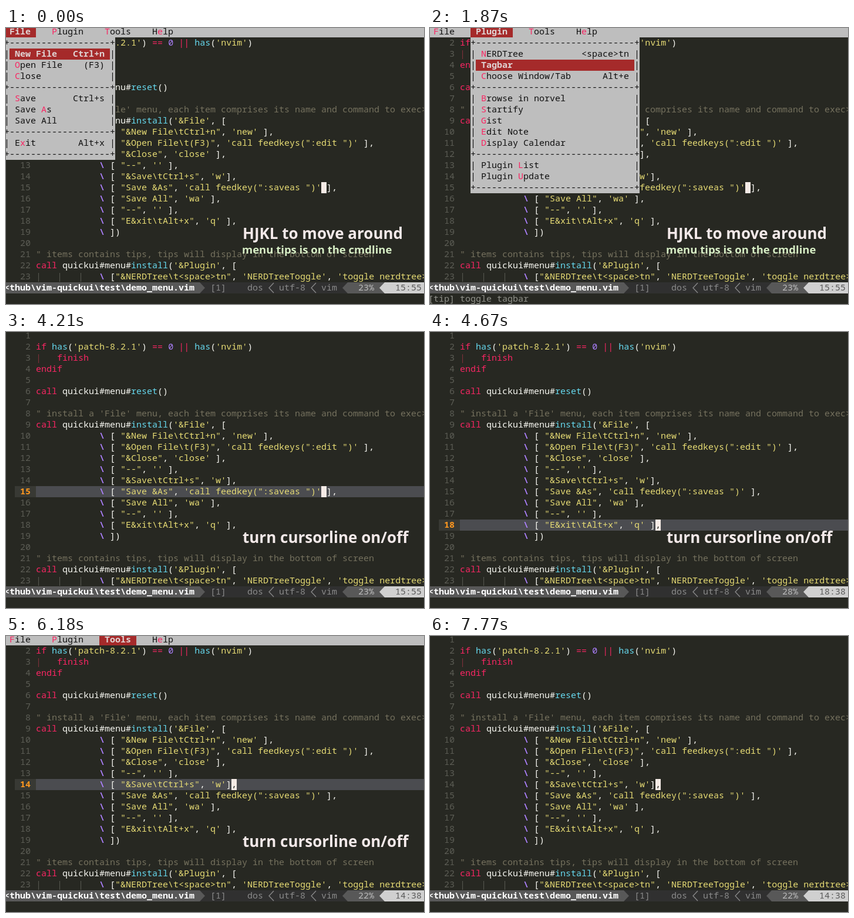
An HTML page for the animation above (8000 ms loop, 712 px wide and 471 px high).

```html
<!DOCTYPE html>
<html lang="en">
<head>
<meta charset="utf-8">
<title>Menu demo</title>
<style>
html, body { margin: 0; width: 100%; height: 100%; overflow: hidden; background: #272822; }
#screen, #bar { position: absolute; left: 0; top: 0; width: 712px; height: 471px; overflow: hidden; }
#screen { font: 500 15px/17px "Noto Sans Mono", monospace; color: #f8f8f2; }
i { position: absolute; height: 19px; white-space: pre; font-style: normal; }
b { font-weight: inherit; }
.fill { position: absolute; height: 19px; }
.kw, .op, .hot { color: #f92663; }
.fn { color: #66d9ef; }
.str { color: #e6db74; }
.num, .cont { color: #ae81ff; }
.cont { font-weight: bold; }
.com { color: #75715e; }
.guide { color: #55564f; }
.guide.red { color: #80303c; }
.nr { color: #5c5d55; }
.nr.on { color: #fd971f; font-weight: bold; }
.cursor { background: #f5ebe6; color: #272822; width: 9px; }
.menu { background: #bebebe; color: #101010; }
.sel { background: #a52a2a; color: #e0d4d4; font-weight: 600; }
.file { color: #fff; font-weight: 600; }
.dim { color: #8a8a8a; }
.pct { color: #bcbcbc; }
.pos { color: #585858; }
.tip { color: #92938c; }
.cap { position: absolute; left: 403px; white-space: pre; font-family: "Open Sans", "Noto Sans", sans-serif; font-weight: 700; }
.big { top: 331px; font-size: 26px; line-height: 38px; color: #f3e9e9; }
.small { top: 364px; left: 402px; font-size: 18.5px; line-height: 28px; color: #d8efc6; }
</style>
</head>
<body>
<svg id="bar" viewBox="0 0 712 471">
  <rect y="434" width="712" height="19" fill="#303030"/>
  <path d="M0 434H330L339 443.5L330 453H0Z" fill="#585858"/>
  <path d="M582 434H712V453H582L573 443.5Z" fill="#585858"/>
  <path d="M645 434H712V453H645L636 443.5Z" fill="#d0d0d0"/>
  <path d="M456 435L448 443.5L456 452M528 435L520 443.5L528 452" fill="none" stroke="#8a8a8a" stroke-width="1.3"/>
</svg>
<div id="screen"></div>
<script>
const LOOP = 8000, CELL = 9, ROW = 19, GUTTER = 6, LINES = 63, WANTED_COL = 55;

const source = String.raw`
if has('patch-8.2.1') == 0 || has('nvim')
|   finish
endif

call quickui#menu#reset()

" install a 'File' menu, each item comprises its name and command to exec>
call quickui#menu#install('&File', [
            \ [ "&New File\tCtrl+n", 'new' ],
            \ [ "&Open File\t(F3)", 'call feedkeys(":edit ")' ],
            \ [ "&Close", 'close' ],
            \ [ "--", '' ],
            \ [ "&Save\tCtrl+s", 'w'],
            \ [ "Save &As", 'call feedkey(":saveas ")' ],
            \ [ "Save All", 'wa' ],
            \ [ "--", '' ],
            \ [ "E&xit\tAlt+x", 'q' ],
            \ ])

" items contains tips, tips will display in the bottom of screen
call quickui#menu#install('&Plugin', [
|   |   |   \ ["&NERDTree\t<space>tn", 'NERDTreeToggle', 'toggle nerdtree>`.split('\n');

// An underscore marks the hotkey, a bar separates the shortcut.
const menus = [
  { title: '_File', col: 0, width: 19, items: ['_New File|Ctrl+n', '_Open File|(F3)', '_Close', '--',
    '_Save|Ctrl+s', 'Save _As', 'Save All', '--', 'E_xit|Alt+x'] },
  { title: '_Plugin', col: 8, width: 30, items: ['_NERDTree|<space>tn', '_Tagbar', '_Choose Window/Tab|Alt+e', '--',
    '_Browse in norvel', '_Startify', '_Gist', '_Edit Note', '_Display Calendar', '--', 'Plugin _List', 'Plugin _Update'] },
  { title: '_Tools', col: 18, width: 20, items: ['Switch _Buffer', '--', 'Set _Spell On', 'Set _Cursor Line On', 'Set _Paste On'] },
  { title: 'H_elp', col: 27, width: 0, items: [] }
];

const timeline = [
  [0, { menu: 0, popup: true, sel: 0, line: 15, tip: '', cursorline: false, cursor: true,
        caption: 'HJKL to move around', note: 'menu tips is on the cmdline', alpha: 1 }],
  [470, { sel: 1 }], [650, { sel: 2 }], [750, { sel: 4 }], [1030, { sel: 2 }], [1210, { sel: 1 }],
  [1400, { menu: 1, sel: 0, tip: 'toggle nerdtree' }],
  [1870, { sel: 1, tip: 'toggle tagbar' }],
  [2150, { menu: 2, sel: 2, tip: 'Toggle spell check on' }],
  [2790, { sel: 3, tip: 'Toggle cursor line on' }],
  [3080, { caption: 'ENTER/SPACE to select', note: '', alpha: 0.5 }],
  [3280, { alpha: 1 }],
  [3740, { menu: -1, tip: '', cursorline: true }],
  [4210, { caption: 'turn cursorline on/off' }],
  [4300, { line: 16 }], [4390, { line: 17 }], [4670, { line: 18 }], [4770, { line: 19 }], [4960, { line: 18 }],
  [5140, { line: 17 }], [5240, { line: 16 }], [5430, { line: 15 }], [5610, { line: 14 }],
  [6080, { menu: 2, popup: false }],
  [6560, { popup: true, tip: 'Toggle cursor line off' }],
  [7290, { cursor: false }],
  [7490, { menu: -1, tip: '', cursor: true }],
  [7570, { cursorline: false }],
  [7770, { caption: '' }]
];

const esc = s => s.replace(/&/g, '&amp;').replace(/</g, '&lt;');
const cell = (col, row, html, cls = '') =>
  `<i class="${cls}" style="left:${col * CELL - 3}px;top:${row * ROW - 3}px">${html}</i>`;
const fill = (x, w, row, color) =>
  `<div class="fill" style="left:${x}px;width:${w}px;top:${row * ROW - 3}px;background:${color}"></div>`;
const plain = s => s.replace('_', '');
const hot = s => esc(s).replace(/_(.)/, '<b class="hot">$1</b>');

const syntax = [
  ['com', '^".*'], ['str', `"[^"]*"|'[^']*'?`], ['op', '==|\\|\\|'], ['guide', '\\| {3}'], ['cont', '\\\\'],
  ['kw', '\\b(?:if|endif|finish|call)\\b'], ['fn', '\\b(?:has|reset|install)\\b'], ['num', '\\b0\\b']
];
const tokens = new RegExp(syntax.map(([name, re]) => `(?<${name}>${re})`).join('|') + '|[^]', 'g');

function highlight(line) {
  return [...line.matchAll(tokens)].map(({ 0: text, groups }) => {
    let cls = Object.keys(groups).find(k => groups[k]);
    if (cls === 'guide' && line.includes('finish')) cls += ' red';
    return cls ? `<b class="${cls}">${esc(text)}</b>` : esc(text);
  }).join('');
}
const code = source.map((line, i) => cell(GUTTER, i, highlight(line))).join('');

function drawMenu(s) {
  let out = fill(0, 712, 0, '#bebebe');
  menus.forEach(({ title, col }, i) => {
    out += i === s.menu ? cell(col, 0, ` ${plain(title)} `, 'sel') : cell(col, 0, ` ${hot(title)} `, 'menu');
  });
  if (!s.popup) return out;

  const { col, width, items } = menus[s.menu];
  const wide = s.menu === 2 && s.cursorline;
  const inner = width + (wide ? 1 : 0);
  const border = `+${'-'.repeat(inner)}+`;
  out += cell(col, 1, border, 'menu') + cell(col, items.length + 2, border, 'menu');
  items.forEach((item, i) => {
    const row = i + 2;
    if (item === '--') return out += cell(col, row, border, 'menu');
    let [label, key = ''] = item.split('|');
    if (wide && label.includes('Cursor')) label = label.replace('On', 'Off');
    const pad = ' '.repeat(inner - 2 - plain(label).length - key.length);
    out += cell(col, row, `| ${hot(label)}${pad}${esc(key)} |`, 'menu');
    if (i === s.sel) out += cell(col + 1, row, ` ${plain(label)}${pad}${esc(key)} `, 'sel');
  });
  return out;
}

function draw(s) {
  const row = s.line - 1, text = source[row];
  const col = Math.min(WANTED_COL, text.length);
  let out = '';
  if (s.cursorline) out += fill(15, 36, row, '#383934') + fill(51, 661, row, '#4b4c50');
  source.forEach((_, i) => {
    const on = s.cursorline && i === row;
    out += cell(3, i, String(i + 1).padStart(2), on ? 'nr on' : 'nr');
  });
  out += code;
  if (s.cursor) out += cell(GUTTER + col - 1, row, esc(text[col - 1]), 'cursor');
  out += cell(0, 23, esc(String.raw`<thub\vim-quickui\test\demo_menu.vim`), 'file')
    + cell(39, 23, '[1]', 'dim') + cell(46, 23, 'dos', 'dim') + cell(52, 23, 'utf-8', 'dim') + cell(60, 23, 'vim', 'dim')
    + cell(67, 23, Math.floor(s.line * 100 / LINES) + '%', 'pct')
    + cell(74, 23, `${s.line}:${col}`, 'pos');
  if (s.tip) out += cell(0, 24, `[tip] ${s.tip}`, 'tip');
  out += `<div class="cap big" style="opacity:${s.alpha}">${s.caption}</div><div class="cap small">${s.note}</div>`;
  if (s.menu >= 0) out += drawMenu(s);
  return out;
}

const screen = document.getElementById('screen');
const start = performance.now();
let shown = -1;
function tick() {
  const t = (performance.now() - start) % LOOP;
  const step = timeline.filter(([at]) => at <= t).length;
  if (step !== shown) {
    shown = step;
    screen.innerHTML = draw(Object.assign({}, ...timeline.slice(0, step).map(([, change]) => change)));
  }
  requestAnimationFrame(tick);
}
tick();
</script>
</body>
</html>
```
